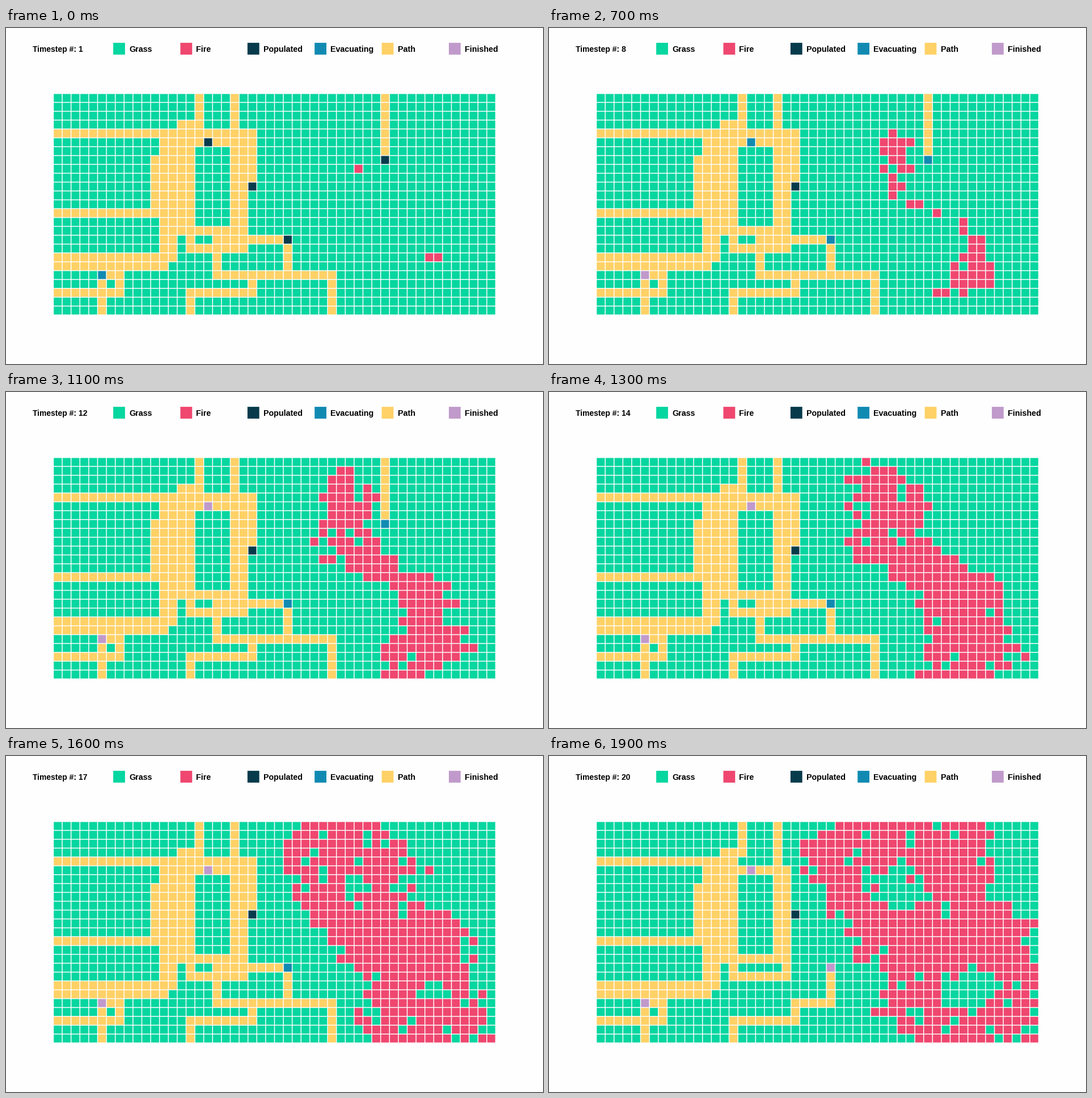
A matplotlib script that plays this animation: 947 by 592 pixels, repeating every 2000 ms.

```python
import numpy as np
import matplotlib.pyplot as plt
from matplotlib.animation import FuncAnimation
from matplotlib.collections import PolyCollection

W, H, DPI = 947, 592, 64
ROWS, COLS = 25, 50
STEPS, STEP_MS = 20, 100
PITCH, GAP, LEFT, TOP = 15.6, 1.5, 83.5, 115.5

GRASS, FIRE, POPULATED, EVACUATING, PATH, FINISHED = range(6)
LABELS = ["Grass", "Fire", "Populated", "Evacuating", "Path", "Finished"]
COLORS = np.array(["#06d6a0", "#ef476f", "#073b4c",
                   "#118ab2", "#ffd166", "#c09acb"])

# Each road runs through (col, row) corners; a diagonal pair fills a block
ROADS = [
    [(12, 5), (15, 15)],
    [(12, 16), (13, 17)],
    [(11, 7), (11, 12)],
    [(0, 4), (15, 4)],
    [(16, 0), (16, 3), (14, 3)],
    [(20, 0), (20, 15)],
    [(0, 13), (15, 13)],
    [(12, 5), (21, 5), (21, 17), (15, 17), (15, 15), (20, 15)],
    [(0, 18), (13, 18)],
    [(0, 19), (12, 19)],
    [(5, 20), (5, 24)],
    [(6, 20), (7, 20), (7, 22), (0, 22)],
    [(15, 24), (15, 22), (22, 22), (22, 20), (26, 20), (26, 16)],
]

# Roads given up at a step, when the fire cuts them
DOOMED = {
    13: [(37, 0), (37, 6)],
    18: [(25, 16), (18, 16), (18, 20), (31, 20), (31, 24)],
    20: [(16, 4), (22, 4), (22, 9)],
}

# Homes: (col, row) -> state from each step on
HOMES = {
    (5, 20): {1: EVACUATING, 8: FINISHED},
    (17, 5): {1: POPULATED, 3: EVACUATING, 12: FINISHED},
    (37, 7): {1: POPULATED, 4: EVACUATING, 13: GRASS},
    (22, 10): {1: POPULATED},
    (26, 16): {1: POPULATED, 8: EVACUATING, 19: FINISHED},
}

# Fire edges at a few rows and steps; where they cross, nothing burns
KEY_ROWS = [0, 4, 8, 11, 14, 18, 21, 24]
KEY_STEPS = [1, 10, 15, 20]
WEST = [[36, 36, 34, 38, 44, 42, 46, 46],
        [36, 31, 31, 31, 39, 41, 37, 39.5],
        [27, 28, 28, 29.5, 34, 36.5, 35, 35],
        [26, 23, 25.5, 27.5, 29, 33.5, 30.5, 35]]
EAST = [[32, 32, 34, 32, 40, 43, 39, 39],
        [30, 35, 35, 34, 42, 44, 46, 39],
        [31, 38, 36, 43, 46, 46, 49, 48],
        [44, 44, 44.5, 49, 48, 49, 49, 49]]
SOURCES = [(34, 7), (42.5, 18.5)]

rng = np.random.default_rng(4)
fray = rng.normal(0, 0.8, (ROWS, COLS))
luck = rng.random((ROWS, COLS))
row, col = np.mgrid[:ROWS, :COLS]


def edge(keys, step):
    """Column of a fire edge in every row."""
    now = [np.interp(step, KEY_STEPS, k) for k in np.transpose(keys)]
    return np.interp(row, KEY_ROWS, now)


def burning(step):
    rough = min((step - 1) / 10, 1)
    depth = np.minimum(col - edge(WEST, step), edge(EAST, step) - col)
    fire = (depth + rough * fray >= 0) & (luck > 0.06 * rough)
    # Ground burns out around the places where the fire began
    spent = 0.35 * max(step - 14, 0) * (0.5 + luck)
    for x, y in SOURCES:
        fire &= np.hypot((col - x) / 1.4, row - y) >= spent
    return fire


def pave(grid, road):
    for a, b in zip(road, road[1:]):
        (c0, c1), (r0, r1) = map(sorted, zip(a, b))
        grid[r0:r1 + 1, c0:c1 + 1] = PATH


def state(step):
    grid = np.full((ROWS, COLS), GRASS)
    for road in ROADS + [r for end, r in DOOMED.items() if step < end]:
        pave(grid, road)
    for (c, r), changes in HOMES.items():
        grid[r, c] = changes[max(s for s in changes if s <= step)]
    grid[burning(step) & (grid == GRASS)] = FIRE
    return grid


def square(x, y, size):
    return [(x, y), (x + size, y), (x + size, y + size), (x, y + size)]


fig = plt.figure(figsize=(W / DPI, H / DPI), dpi=DPI, facecolor="#fefefe")
ax = fig.add_axes([0, 0, 1, 1])
ax.set(xlim=(0, W), ylim=(H, 0))
ax.axis("off")


def write(x, text, px):
    return ax.text(x, 41.7, text, family="Liberation Sans", weight="bold",
                   fontsize=px * 72 / DPI, va="baseline", ha="left")


def add_squares(squares, **style):
    return ax.add_collection(PolyCollection(
        squares, edgecolors="none", linewidths=0, snap=False, **style))


title = write(47, "", 13.9)
legend_x = 189.1 + W / 8 * np.arange(len(LABELS))
add_squares([square(x, 26.1, 20.8) for x in legend_x], facecolors=COLORS)
for x, label in zip(legend_x, LABELS):
    write(x + 28, label, 14.2)

tiles = add_squares([square(LEFT + PITCH * c + GAP / 2,
                            TOP + PITCH * r + GAP / 2, PITCH - GAP)
                     for r in range(ROWS) for c in range(COLS)])


def draw(frame):
    step = frame + 1
    title.set_text(f"Timestep #: {step}")
    tiles.set_facecolor(COLORS[state(step).ravel()])
    return title, tiles


anim = FuncAnimation(fig, draw, frames=STEPS, interval=STEP_MS,
                     init_func=lambda: draw(0), repeat=True, repeat_delay=0)
plt.show()
```
